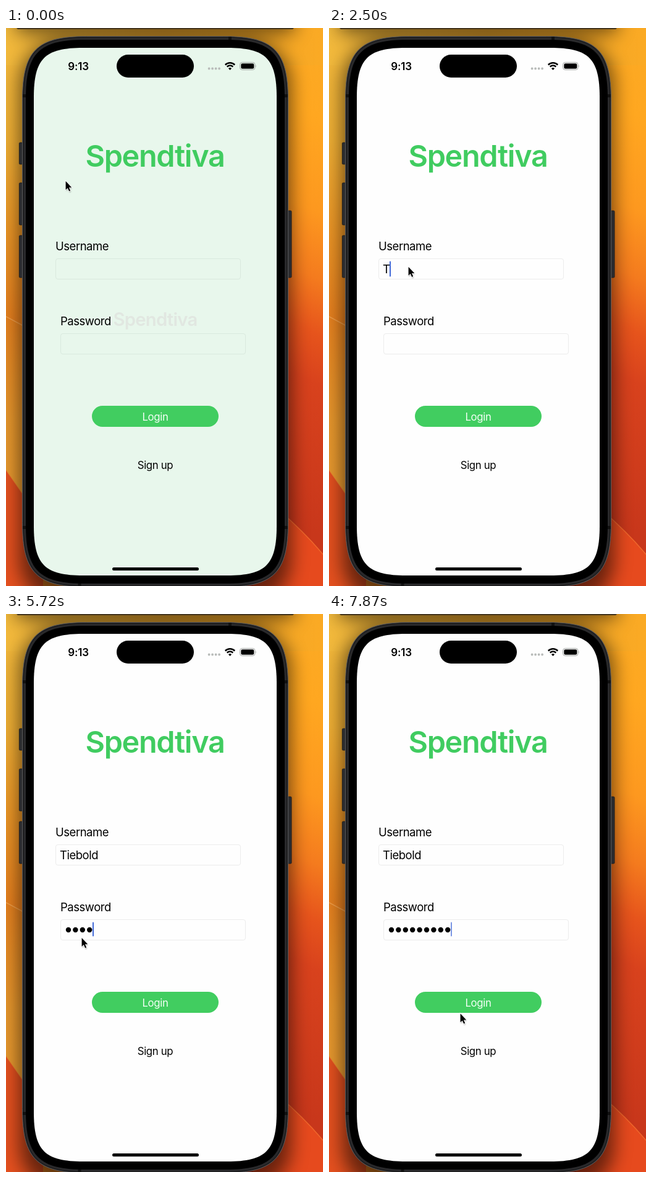
Animation of 513 by 901 pixels, one loop 8 s. Source, as an HTML page:

```html
<!DOCTYPE html>
<html lang="en">
<head>
<meta charset="utf-8">
<title>Login screen</title>
<style>
  html, body { margin: 0; width: 100%; height: 100%; overflow: hidden; background: #d9781e; }
  svg { display: block; width: 513px; height: 901px; }
  text { font-family: Inter, Roboto, sans-serif; fill: #000; }
  .label { font-size: 18.5px; letter-spacing: -.48px; }
  .action { font-size: 16.8px; letter-spacing: -.35px; text-anchor: middle; }
  .title { font-weight: 600; text-anchor: middle; }
  .clock { font-size: 17px; font-weight: 600; letter-spacing: -.2px; text-anchor: middle; }
  .field { fill: none; stroke: #ececec; }
  .tinted .field { stroke: #d9e9de; }
  .tinted #screen { fill: #e8f7ec; }
  #ghost { visibility: hidden; }
  .tinted #ghost { visibility: visible; }
</style>
</head>
<body>
<svg viewBox="0 0 513 901">
  <defs>
    <linearGradient id="left" x2="0" y2="1">
      <stop offset="0" stop-color="#f2b93c"/>
      <stop offset=".2" stop-color="#eeae34"/>
      <stop offset=".36" stop-color="#ea9526"/>
      <stop offset=".52" stop-color="#e57f1e"/>
    </linearGradient>
    <linearGradient id="leftLow" x2="0" y2="1">
      <stop offset="0" stop-color="#e5811f"/>
      <stop offset=".5" stop-color="#e6962c"/>
      <stop offset="1" stop-color="#e79a30"/>
    </linearGradient>
    <linearGradient id="right" gradientUnits="userSpaceOnUse" x1="485" y1="0" x2="148" y2="748">
      <stop offset="0" stop-color="#fbaa24"/>
      <stop offset=".15" stop-color="#ffa720"/>
      <stop offset=".32" stop-color="#fd981f"/>
      <stop offset=".44" stop-color="#f47b1e"/>
      <stop offset=".54" stop-color="#e6541c"/>
      <stop offset=".63" stop-color="#d8421d"/>
      <stop offset=".9" stop-color="#c8371b"/>
    </linearGradient>
    <linearGradient id="top">
      <stop offset="0" stop-color="#f2b93c"/>
      <stop offset=".5" stop-color="#e3a02a"/>
      <stop offset="1" stop-color="#fbaa24"/>
    </linearGradient>
    <filter id="blur" x="-20%" y="-20%" width="140%" height="140%">
      <feGaussianBlur stdDeviation="15"/>
    </filter>
    <filter id="soft" x="-50%" y="-50%" width="200%" height="200%">
      <feGaussianBlur stdDeviation=".9"/>
    </filter>
  </defs>

  <!-- wallpaper -->
  <rect width="256" height="901" fill="url(#left)"/>
  <rect x="256" width="257" height="901" fill="url(#right)"/>
  <rect width="513" height="60" fill="url(#top)"/>
  <path d="M0 466L60 498V800H0Z" fill="url(#leftLow)"/>
  <path d="M0 466L60 498" stroke="#f3a04a" stroke-width="1.5"/>
  <path d="M0 714L60 800V901H0Z" fill="#e4501f"/>
  <path d="M0 714L60 800" stroke="#ef7a2c" stroke-width="1"/>
  <path d="M440 777Q484 815 513 850V901H400V777Z" fill="#e64a1e"/>
  <path d="M440 777Q484 815 513 850" fill="none" stroke="#f0682c" stroke-width="1.5"/>
  <g opacity=".55" filter="url(#blur)">
    <rect x="22" y="20" width="439" height="910" rx="70"/>
    <rect x="17" y="-200" width="449" height="208"/>
  </g>
  <path d="M17 0H466L464 2H19Z" fill="#46371f"/>

  <!-- phone -->
  <g fill="#2b2c2f" stroke="#17181a" stroke-width=".8">
    <rect x="21.4" y="185" width="7" height="35" rx="1.5"/>
    <rect x="21.4" y="250" width="7" height="68" rx="1.5"/>
    <rect x="21.4" y="335" width="7" height="68" rx="1.5"/>
    <rect x="455" y="295" width="7" height="108" rx="1.5"/>
  </g>
  <path id="frame" fill="#29292b" stroke="#5b5b5d"/>
  <path id="groove" fill="none" stroke="#141415"/>
  <path d="M27 109.5h6M450 109.5h6M27 806.5h6M450 806.5h6M362.5 14v5M119 897v5" stroke="#111" stroke-width="5"/>
  <path id="bezel"/>

  <g id="app">
    <path id="screen" fill="#fefefe"/>
    <rect x="179" y="43" width="125" height="37" rx="18.5"/>
    <text class="clock" x="117" y="67.5">9:13</text>
    <path d="M328.6 65.5h17" stroke="#b9bcba" stroke-width="3.8" stroke-linecap="round" stroke-dasharray="0 5.5"/>
    <g fill="none" stroke="#000" stroke-width="2.5">
      <path d="M354.8 59.5a10.9 10.9 0 0 1 15.4 0"/>
      <path d="M357.7 62.6a6.8 6.8 0 0 1 9.6 0"/>
    </g>
    <path d="M362.5 68l-2.6-2.8a3.7 3.7 0 0 1 5.2 0Z"/>
    <rect x="378.5" y="55.5" width="24.5" height="12" rx="3.8" fill="none" stroke="#a2a5a3"/>
    <rect x="380.3" y="57.2" width="21" height="8.6" rx="2.3"/>
    <path d="M404.3 59.6q1.5 1.9 0 3.8Z" fill="#a2a5a3"/>

    <text class="title" x="241" y="223.8" font-size="48.5" letter-spacing="-1.3" style="fill:#40cc60">Spendtiva</text>
    <text class="title" id="ghost" x="241.5" y="481" font-size="29.3" letter-spacing="-.8" style="fill:#e1e7e1">Spendtiva</text>

    <text class="label" x="80" y="359">Username</text>
    <rect class="field" x="80.5" y="372.5" width="299" height="33" rx="3.5"/>
    <text class="label" id="name" x="87" y="396"></text>
    <text class="label" x="88" y="480">Password</text>
    <rect class="field" x="88.5" y="493.5" width="299" height="33" rx="3.5"/>
    <g id="dots"></g>
    <rect id="caret" width="2" rx=".8" fill="#4169d8"/>

    <rect x="139" y="610" width="205" height="34" rx="17" fill="#41cd60"/>
    <text class="action" x="241.5" y="633.5" style="fill:#f4fff6">Login</text>
    <text class="action" x="241.5" y="712">Sign up</text>
    <rect x="172" y="871" width="140" height="5" rx="2.5"/>
  </g>

  <g id="pointer">
    <path d="M0 0V14.5L3.3 11.5L5.8 17L8 16L5.6 10.6H10Z" transform="translate(.4 1.2)" opacity=".4" filter="url(#soft)"/>
    <path d="M0 0V14L3.2 11.1L5.5 16.3L7.6 15.4L5.3 10.2H9.7Z" stroke="#fff" stroke-width="1.6" paint-order="stroke"/>
  </g>
</svg>
<script>
  const LOOP = 8000;
  const USER = "Tiebold";
  const $ = id => document.getElementById(id);
  const app = $("app"), nameText = $("name"), dots = $("dots"), caret = $("caret"), pointer = $("pointer");

  const set = (el, attrs) => {
    for (const key in attrs) el.setAttribute(key, attrs[key]);
  };

  // Box with continuous corners: e is the corner's reach, c its control distance.
  function smoothBox(id, x, y, w, h, e, c) {
    const r = x + w, b = y + h;
    set($(id), {
      d: `M${x} ${y + e}C${x} ${y + c} ${x + c} ${y} ${x + e} ${y}` +
         `H${r - e}C${r - c} ${y} ${r} ${y + c} ${r} ${y + e}` +
         `V${b - e}C${r} ${b - c} ${r - c} ${b} ${r - e} ${b}` +
         `H${x + e}C${x + c} ${b} ${x} ${b - c} ${x} ${b - e}Z`
    });
  }
  smoothBox("frame", 26.5, 13.5, 430, 889, 104, 23);
  smoothBox("groove", 28, 15, 427, 886, 102, 22.5);
  smoothBox("bezel", 32, 19, 419, 878, 95, 21.5);
  smoothBox("screen", 45, 32, 393, 852, 80, 17.5);

  for (let i = 0; i < 9; i++) {
    const dot = document.createElementNS("http://www.w3.org/2000/svg", "circle");
    set(dot, { cx: 101 + 11.4 * i, cy: 510, r: 4.2 });
    dots.append(dot);
  }

  // Each step lists only what changes at its time (ms).
  const steps = [
    { t: 0, x: 96.6, y: 247.3, tint: true, typed: 0, hidden: 0, field: "name", blink: 0 },
    { t: 360, tint: false },
    { t: 710, x: 122.6, y: 344 },
    { t: 1070, x: 128.6, y: 385.7 },
    { t: 1430, blink: 1 },
    { t: 2140, blink: 0 },
    { t: 2500, typed: 1, blink: 1 },
    { t: 2860, typed: 3 },
    { t: 3210, typed: 6 },
    { t: 3570, typed: 7, x: 125.6, y: 440.3 },
    { t: 3930, x: 122.6, y: 523, blink: .5 },
    { t: 4290, field: "password", blink: 1 },
    { t: 5000, blink: 0 },
    { t: 5360, hidden: 2, blink: 1 },
    { t: 5720, hidden: 4 },
    { t: 6080, hidden: 5 },
    { t: 6440, hidden: 7 },
    { t: 6800, hidden: 8 },
    { t: 7150, blink: .7 },
    { t: 7510, hidden: 9, blink: 1 },
    { t: 7870, x: 212.6, y: 645.3, blink: .7 }
  ];
  for (let i = 1; i < steps.length; i++) steps[i] = { ...steps[i - 1], ...steps[i] };

  function show(s) {
    app.classList.toggle("tinted", s.tint);
    nameText.textContent = USER.slice(0, s.typed);
    [...dots.children].forEach((dot, i) => set(dot, { opacity: i < s.hidden ? 1 : 0 }));
    const place = s.field === "name"
      ? { x: Math.round(87 + (s.typed ? nameText.getComputedTextLength() : 0)), y: 376.5, height: 25 }
      : { x: Math.floor(95 + 11.4 * s.hidden), y: 497.5, height: 23 };
    set(caret, { ...place, opacity: s.blink });
    set(pointer, { transform: `translate(${s.x} ${s.y})` });
  }

  let current;
  function tick() {
    const t = performance.now() % LOOP;
    const step = steps.findLast(s => s.t <= t);
    if (step !== current) show(current = step);
    requestAnimationFrame(tick);
  }
  tick();
</script>
</body>
</html>
```
